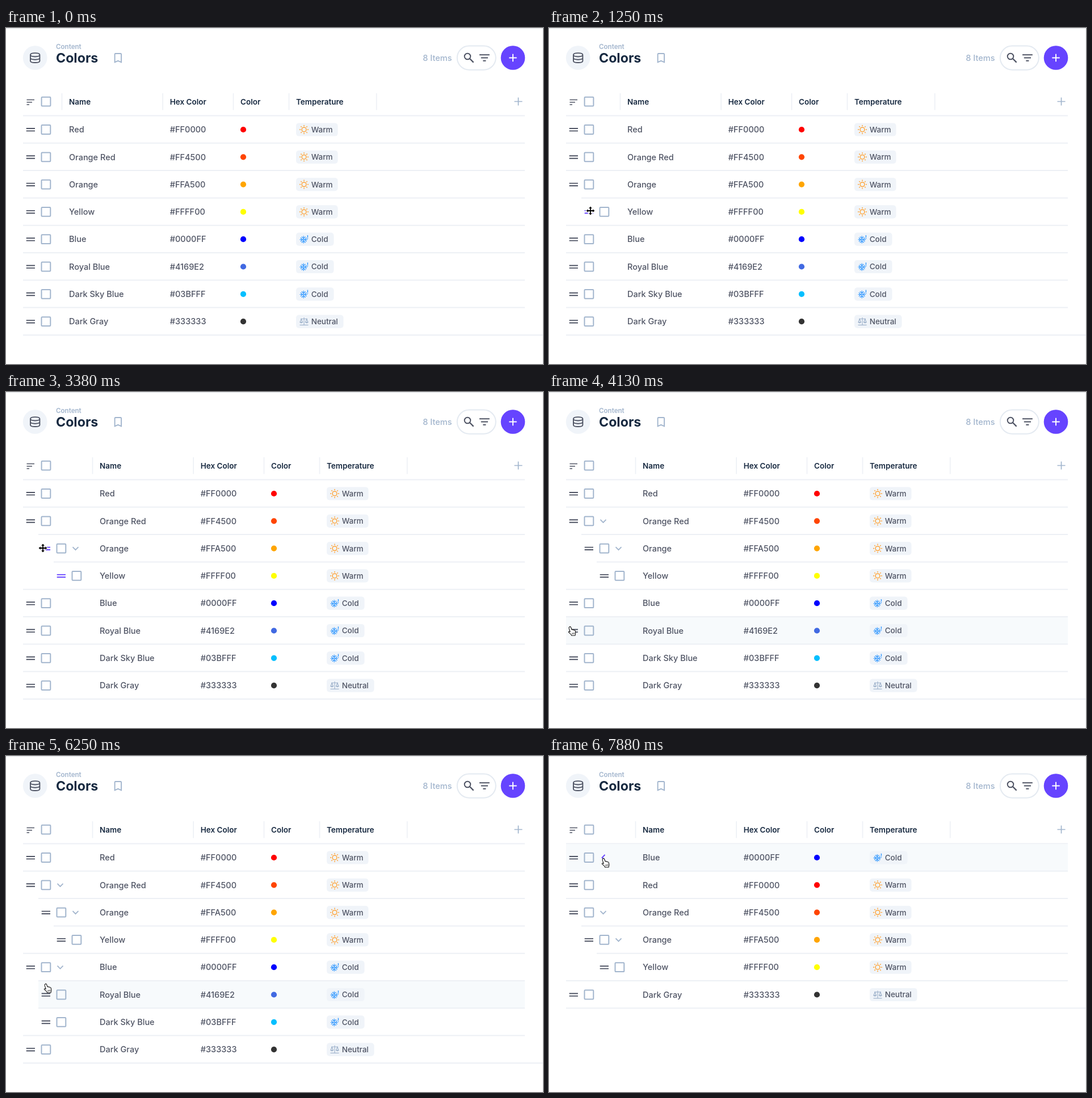
Animation, 946 px wide and 592 px high, one loop 8000 ms. Source, as an HTML page:

```html
<!DOCTYPE html>
<html lang="en">
<head>
<meta charset="utf-8">
<title>Colors</title>
<style>
  html, body { margin: 0; width: 100%; height: 100%; overflow: hidden; background: #fff; }
  svg { display: block; width: 946px; height: 592px; font-family: Inter, "Liberation Sans", sans-serif; }
  text { white-space: pre; }
  .cell { font-size: 14.5px; font-weight: 500; }
  .chip { font-size: 13.5px; font-weight: 500; }
  .head { font-size: 13.5px; font-weight: 600; }
</style>
</head>
<body>
<svg id="stage" viewBox="0 0 946 592"></svg>
<script>
const INK = '#4f5464', NAVY = '#172940', SOFT = '#a2b5cd', PALE = '#f0f4f9',
      RULE = '#edf0f5', PURPLE = '#6644ff', HOVER = '#f7fafc';
const LOOP = 8000, STEP = 125, ROW = 48.3, INDENT = 27;

const row = (name, hex, kind) => ({ name, hex, kind });
const red = row('Red', '#FF0000', 'Warm'),
      orangeRed = row('Orange Red', '#FF4500', 'Warm'),
      orange = row('Orange', '#FFA500', 'Warm'),
      yellow = row('Yellow', '#FFFF00', 'Warm'),
      blue = row('Blue', '#0000FF', 'Cold'),
      royal = row('Royal Blue', '#4169E2', 'Cold'),
      sky = row('Dark Sky Blue', '#03BFFF', 'Cold'),
      gray = row('Dark Gray', '#333333', 'Neutral');

// Times at which a row moves one level deeper
const nesting = new Map([[yellow, [1125, 3125]], [orange, [3125]], [royal, [4375]], [sky, [5125]]]);
const drags = [
  { item: yellow, from: 1000, to: 1625 },
  { item: orange, from: 2875, to: 3750 },
  { item: royal, from: 4250, to: 4500 },
  { item: sky, from: 4875, to: 5500 },
  { item: blue, from: 6625, to: 7250 }
];
// Cursor path: time, x, y
const path = [
  [250, 110, 510], [625, 60, 350], [875, 43, 325], [1000, 43, 323], [1125, 60, 322], [1250, 73, 322],
  [1500, 74, 322], [1875, 66, 326], [2500, 38, 277], [2875, 38, 275], [3375, 65, 275], [3750, 66, 275],
  [4125, 40, 421], [4250, 41, 421], [4500, 70, 421], [4625, 66, 430], [4875, 32, 468], [5000, 32, 469],
  [5375, 62, 469], [5750, 64, 469], [6000, 78, 440], [6250, 73, 409], [6500, 42, 378], [6625, 42, 376],
  [7000, 42, 187], [7375, 44, 187], [7500, 84, 188], [7625, 99, 188], [LOOP, 99, 188]
];

function cursorAt(t) {
  const i = Math.max(1, path.findIndex(k => k[0] > t));
  const [t0, x0, y0] = path[i - 1], [t1, x1, y1] = path[i];
  const p = Math.max(0, (t - t0) / (t1 - t0));
  return { x: x0 + (x1 - x0) * p, y: y0 + (y1 - y0) * p };
}

const line = (d, color, width = 1.9, extra = '') =>
  `<path d="${d}" fill="none" stroke="${color}" stroke-width="${width}" ${extra}/>`;
const text = (x, y, s, cls, color, extra = '') =>
  `<text x="${x}" y="${y}" class="${cls}" fill="${color}" ${extra}>${s}</text>`;
const rect = (x, y, w, h, r, fill, extra = '') =>
  `<rect x="${x}" y="${y}" width="${w}" height="${h}" rx="${r}" fill="${fill}" ${extra}/>`;
const circle = (x, y, r, fill, extra = '') => `<circle cx="${x}" cy="${y}" r="${r}" fill="${fill}" ${extra}/>`;
const at = (x, y, s) => `<g transform="translate(${x} ${y})">${s}</g>`;
const spin = (n, s) => Array.from({ length: n }, (_, i) => `<g transform="rotate(${i * 360 / n})">${s}</g>`).join('');
const box = (x, y) => rect(x - 7.9, y - 7.9, 15.8, 15.8, 1.2, 'none', `stroke="${SOFT}" stroke-width="2"`);
const rule = (x0, x1, y) => line(`M${x0} ${y}H${x1}`, RULE, 2);

const chips = {
  Warm: { width: 73.5, icon: circle(0, 0, 3.9, 'none', 'stroke="#ffa439" stroke-width="1.5"') +
    spin(8, line('M0-5.9V-8', '#ffa439', 1.5)) },
  Cold: { width: 66.5, icon: at(-.8, .7, spin(4, line('M0 0H6.7M5.3-3.4L2 0L5.3 3.4', '#3399ff', 1.2))) +
    line('M6.4-7.2v4.3M6.4-1.9v1.4', '#3399ff', 1.4) },
  Neutral: { width: 83.5, icon: line('M0-7V6.3M-7.5 6.3H7.5M-6-4.6H6M-4.8-4.4L-7 1.2H-2.6ZM4.8-4.4L2.6 1.2H7Z' +
    'M-7.2 1.3q2.4 2.6 4.8 0M2.4 1.3q2.4 2.6 4.8 0', SOFT, 1.2) }
};

const hand = `<path d="M-3.8-7.5c1.2-.6 2 0 2.3 1l1.6 4.3c.8-.6 1.9-.4 2.2.4c.9-.5 1.8-.1 2 .6c1-.3 1.7.2 1.9 1l.6 3.4
  c.2 1.6-.4 2.5-.6 3.6l-.1 1.2h-6.5l-.4-1.2c-1-1.4-3-3-4.6-4.4c-.8-1 .5-2 1.6-1.4l1 .7l-2-6.3c-.3-1.1.2-2 1-2.3z"
  fill="#fff" stroke="#111" stroke-width="1.1" stroke-linejoin="round"/>` +
  line('M.9 3.3v2.6M2.8 3.1v2.6M4.7 2.9v2.6', '#111', .8);
const arrow = 'M-.9 0V-4.2H-2.8L0-7.4L2.8-4.2H.9V0Z';
const move = spin(4, `<path d="${arrow}" fill="#fff" stroke="#fff" stroke-width="2"/>`) +
  spin(4, `<path d="${arrow}" fill="#000"/>`);

const header =
  line('M0 .5H946', '#dfe1e5', 1) + line('M945.5 0V592', '#f3f4f6', 1) +
  circle(51.2, 52.5, 21.3, PALE) +
  line('M43 47.3c0-4.2 16.4-4.2 16.4 0s-16.4 4.2-16.4 0v10.6c0 4.2 16.4 4.2 16.4 0V47.3M43 52.6c0 4.2 16.4 4.2 16.4 0', INK) +
  text(88, 37.2, 'Content', '', SOFT, 'font-size="11.6" font-weight="600"') +
  text(88, 61.3, 'Colors', '', NAVY, 'font-size="23.2" font-weight="700"') +
  line('M191.6 60.3V46.4q0-1.4 1.4-1.4h8.7q1.4 0 1.4 1.4V60.3l-5.75-2.5Z', SOFT) +
  text(785.5, 58, '8 Items', 'cell', SOFT, 'text-anchor="end"') +
  rect(794.8, 31.5, 68, 42.2, 21.1, '#fff', 'stroke="#e4eaf1" stroke-width="2"') +
  circle(813, 50, 5.3, 'none', `stroke="${INK}" stroke-width="2"`) + line('M816.8 53.8L823.6 60.6', INK, 2.3) +
  line('M834 47.2H851.8M836.8 52.5H849M840.3 57.8H845.4', INK) +
  circle(893, 52.5, 21.3, PURPLE) + line('M886.3 52.5H899.7M893 45.8V59.2', '#fff') +
  line('M36.5 126.5H50M36.5 130.7H46M36.5 135H41', INK, 1.6) + box(70.5, 129.6) +
  line('M895.5 129.5H909.5M902.5 122.5V136.5', SOFT, 1.7) + rule(30, 914, 154.5);

function columns(shift) {
  const cells = [[111, 'Name'], [288.7, 'Hex Color'], [413, 'Color'], [511, 'Temperature'], [665.2, '']];
  return cells.map(([x, s]) => line(`M${x + shift - 12.5} 115V144.5`, RULE, 1.7) +
    text(x + shift, 134.8, s, 'head', NAVY)).join('');
}

function drawRow(r, y, level, shift, o) {
  const x = level * INDENT, chip = chips[r.kind], chevColor = o.chevronHover ? PURPLE : SOFT;
  let s = o.hover ? rect(30 + x, y - 24, 884 - x, 48, 0, HOVER) : '';
  s += at(x, y, line('M35.7-2H51M35.7 2.4H51', o.grabbed ? PURPLE : INK) + box(70.4, 0));
  if (o.chevron) s += at(x + 95.5, y, line(o.closed ? 'M3-5L-2 0L3 5' : 'M-5-2.5L0 2.6L5-2.5', chevColor, 1.8));
  return s + at(shift, y,
    text(111, 5.2, r.name, 'cell', INK) + text(288.7, 5.2, r.hex, 'cell', INK) +
    circle(418, 0, 5.1, r.hex) +
    rect(511, -11.6, chip.width, 23.2, 5, PALE) + at(525, 0, chip.icon) +
    text(537.7, 4.9, r.kind, 'chip', INK));
}

function frame(t) {
  const cur = cursorAt(t), drag = drags.find(d => t >= d.from && t < d.to), closed = t >= 7875;
  const level = r => (nesting.get(r) || []).filter(k => t >= k).length;

  // The blue group follows the cursor upward while dragged
  const slot = t < 6625 ? 4 : t >= 7000 ? 0 : Math.max(0, Math.min(4, Math.round((cur.y - 187) / ROW)));
  const rows = [red, orangeRed, orange, yellow, gray];
  rows.splice(slot, 0, ...(closed ? [blue] : [blue, royal, sky]));

  const shift = INDENT * Math.max(...rows.map(level));
  const over = Math.floor((cur.y - 154.5) / ROW);
  const hovering = t >= 250 && (!drag || t - drag.from <= STEP);
  let out = header + columns(shift), rules = '', inGroup = false;

  rows.forEach((r, i) => {
    const y = 179 + ROW * i, next = rows[i + 1];
    if (drag) inGroup = r === drag.item || (inGroup && level(r) > level(drag.item));
    const parent = next && level(next) > level(r) && !(drag && next === drag.item);
    out += drawRow(r, y, level(r), shift, {
      hover: hovering && over === i,
      grabbed: inGroup,
      chevron: parent || (closed && r === blue),
      closed: closed && r === blue,
      chevronHover: r === blue && t >= 7625
    });
    rules += next ? rule(30 + INDENT * level(next), 914, y + 23.8) : rule(30, 946, y + 23.8);
  });
  return out + rules + (t >= 250 ? at(cur.x, cur.y, drag ? move : hand) : '');
}

const stage = document.getElementById('stage'), start = performance.now();
let shown = -1;
function tick() {
  const t = Math.floor((performance.now() - start) % LOOP / STEP) * STEP;
  if (t !== shown) stage.innerHTML = frame(shown = t);
  requestAnimationFrame(tick);
}
tick();
</script>
</body>
</html>
```
